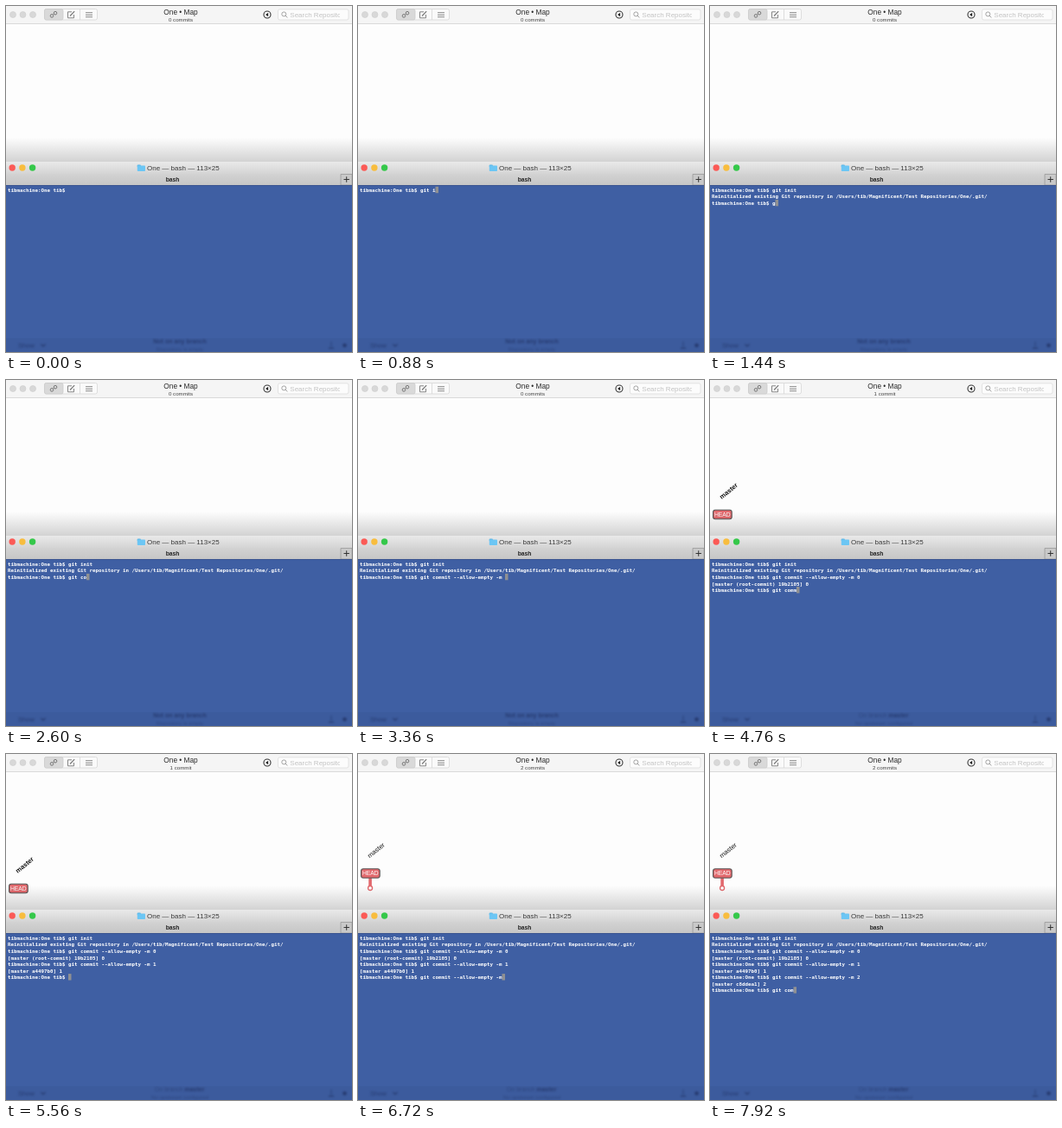
Write an HTML page with a canvas that moves like this. It is 400 px wide and 400 px high and loops after 8 s.

```html
<!DOCTYPE html>
<html lang="en">
<head>
<meta charset="utf-8">
<title>Terminal and map</title>
<style>
  html, body { margin: 0; width: 100%; height: 100%; overflow: hidden; background: #fdfdfd; }
  canvas { display: block; width: 100vw; height: 100vh; }
</style>
</head>
<body>
<canvas id="stage"></canvas>
<script>
const LOOP = 8000, SIZE = 400;
const SANS = '"Liberation Sans", Arial, sans-serif';
const MONO = '"DejaVu Sans Mono", monospace';
const CELL = 3.5, ROW = 7.55, LEFT = 2, TOP = 208.8;
const PROMPT = 'tibmachine:One tib$ ';
const FLAGS = '--allow-empty -m';
const FIRST_COMMIT = 4560, SECOND_COMMIT = 6080;

const canvas = document.getElementById('stage');
const ctx = canvas.getContext('2d');

// Terminal session: each event appends text at its time
const events = [];
const add = (time, text) => events.push({ time, text });
function type(from, to, text) {
  const step = (to - from) / (text.length - 1);
  [...text].forEach((char, i) => add(Math.round((from + i * step) / 40) * 40, char));
}

add(0, PROMPT);
add(240, 'g');
type(640, 1040, 'it init');
add(1200, '\n');
add(1240, 'Reinitialized existing Git repository in /Users/tib/Magnificent/Test Repositories/One/.git/\n');
add(1280, PROMPT);
add(1440, 'g');
type(2040, 2120, 'it');
type(2440, 2840, ' commi');
add(2920, 't ');
add(3080, FLAGS);
add(3360, ' ');
add(3640, '0');
add(3840, '\n');
add(4040, '[master (root-commit) 19b2105] 0\n');
add(4080, PROMPT);
type(4240, 4760, 'git comm');
type(4840, 4960, 'it ');
add(5080, FLAGS);
add(5320, ' ');
add(5400, '1');
add(5560, '\n[master a4497b0] 1\n' + PROMPT);
add(5720, 'g');
type(5920, 6560, 'it commit ');
add(6720, FLAGS);
add(7000, ' ');
add(7040, '2');
add(7240, '\n');
add(7320, '[master c8ddea1] 2\n');
add(7400, PROMPT);
type(7560, 7840, 'git c');
add(7920, 'om');

// Text is set large and scaled down so that glyph advances stay fractional
function label(text, x, y, size, color, { align = 'center', weight = '', family = SANS, angle = 0 } = {}) {
  ctx.save();
  ctx.translate(x, y);
  ctx.rotate(angle);
  ctx.scale(size / 100, size / 100);
  ctx.font = `${weight} 100px ${family}`;
  ctx.textAlign = align;
  ctx.fillStyle = color;
  ctx.fillText(text, 0, 0);
  ctx.restore();
}

function box(x, y, w, h, fill, stroke, radius = 0, width = 1) {
  ctx.beginPath();
  ctx.roundRect(x, y, w, h, radius);
  paint(fill, stroke, width);
}

function disc(x, y, r, fill, stroke, width = 1) {
  ctx.beginPath();
  ctx.arc(x, y, r, 0, Math.PI * 2);
  paint(fill, stroke, width);
}

function path(points, fill, stroke, width = 1) {
  ctx.beginPath();
  points.forEach(([x, y]) => ctx.lineTo(x, y));
  paint(fill, stroke, width);
}

function paint(fill, stroke, width) {
  if (fill) { ctx.fillStyle = fill; ctx.fill(); }
  if (stroke) { ctx.strokeStyle = stroke; ctx.lineWidth = width; ctx.stroke(); }
}

function shade(y0, y1, from, to) {
  const g = ctx.createLinearGradient(0, y0, 0, y1);
  g.addColorStop(0, from);
  g.addColorStop(1, to);
  return g;
}

function drawToolbar(commits) {
  box(0, 0, SIZE, 20.5, '#f5f5f5');
  box(0, 20, SIZE, 1, '#dadada');
  for (const x of [8, 19.5, 31]) disc(x, 10, 3.5, '#d8d8d8', '#cdcdcd', 0.6);

  box(44.5, 3.5, 61, 12.5, '#fafafa', '#d6d6d6', 2, 0.8);
  box(44.5, 3.5, 21.5, 12.5, '#d9d9d9', '#cccccc', 2, 0.8);
  box(85, 4, 0.8, 12, '#d6d6d6');
  disc(53, 11.4, 1.8, null, '#777', 1);
  disc(57, 8.2, 1.8, null, '#777', 1);
  path([[54.3, 10.4], [55.7, 9.2]], null, '#777');
  path([[76, 6.8], [71.5, 6.8], [71.5, 13.8], [78.5, 13.8], [78.5, 10]], null, '#777', 0.9);
  path([[74, 11.5], [79.2, 6.2]], null, '#777', 1.2);
  for (const y of [7.3, 9.8, 12.3]) box(92, y, 8, 0.9, '#777');

  label('One • Map', 202, 9.9, 8.3, '#2a2a2a');
  label(`${commits} commit${commits === 1 ? '' : 's'}`, 202, 17.8, 6.15, '#444');

  disc(302, 10, 4, '#fff', '#333', 1.1);
  path([[300, 10], [303.2, 7.8], [303.2, 12.2]], '#222');

  box(314.5, 3.8, 81.5, 12.2, '#fcfcfc', '#dcdcdc', 2, 0.8);
  disc(321.3, 9.4, 2.5, null, '#999', 0.9);
  path([[323.1, 11.2], [325.3, 13.4]], null, '#999', 1);
  ctx.save();
  ctx.beginPath();
  ctx.rect(326, 3, 60, 14);
  ctx.clip();
  label('Search Repository', 328.3, 12.8, 8, '#c2c2c2', { align: 'left' });
  ctx.restore();
}

function drawMap(commits) {
  if (!commits) return;
  const y = commits === 1 ? 155.5 : 138;
  if (commits === 2) {
    box(12.3, y + 5, 3.6, 12, '#e2686c');
    disc(14.1, 155, 2.5, '#fff', '#e2686c', 1.3);
  }
  box(3.6, y - 5.2, 21.6, 10.4, '#e2686c', '#555', 2.5, 1.1);
  label('HEAD', 14.3, y + 2.4, 6.7, '#fff');
  label('master', 13.5, y - 17.5, 7.5, '#111',
    { align: 'left', weight: commits === 1 ? 'bold' : '', angle: -0.68 });
}

function drawWindow() {
  box(0, 150, SIZE, 30, shade(152, 180, 'rgba(0,0,0,0)', 'rgba(0,0,0,0.17)'));
  box(0, 180, SIZE, 15, shade(180, 195, '#e9e9e9', '#d3d3d3'));
  box(0, 194.5, SIZE, 12.5, shade(194.5, 207, '#d2d2d2', '#c6c6c6'));
  ['#fb5a56', '#f8bd3e', '#35c84a'].forEach((c, i) => disc(7.2 + i * 11.7, 187, 3.7, c));

  box(151.8, 183.5, 4, 3, '#58b4e6', null, 0.8);
  box(151.8, 184.5, 9.2, 6.6, '#6cc6f4', null, 0.8);
  label('One — bash — 113×25', 163, 189.9, 8, '#3c3c3c', { align: 'left' });
  label('bash', 192.5, 202.8, 6.7, '#222', { weight: 'bold' });

  box(387, 194.5, 13, 12.5, '#c9c9c9', '#9a9a9a', 0, 0.8);
  box(390.5, 200, 6.4, 1, '#333');
  box(393.2, 197.3, 1, 6.4, '#333');
}

function drawBackdrop(commits) {
  const ink = 'rgba(28,42,88,0.62)', faint = 'rgba(28,42,88,0.4)';
  box(0, 207, SIZE, 193, '#3f5fa3');
  box(0, 207, SIZE, 0.8, '#38518a');
  box(0, 384, SIZE, 16, '#3c5b9d');
  ctx.save();
  ctx.filter = 'blur(0.8px)';
  label('Show', 23.5, 394.7, 7.5, ink);
  path([[40.5, 391], [43, 393.5], [45.5, 391]], null, ink, 1.2);
  if (commits) {
    label('On branch ', 206.5, 390.3, 7, faint, { align: 'right' });
    label('master', 206.5, 390.3, 7, ink, { align: 'left', weight: 'bold' });
    label('No upstream configured', 201, 399.4, 6.2, faint);
  } else {
    label('Not on any branch', 201, 390.3, 7, ink, { weight: 'bold' });
    label('Repository is empty', 201, 399.4, 6.2, faint);
  }
  path([[376, 388], [376, 394]], null, faint, 1.2);
  path([[373, 395.5], [379, 395.5]], null, ink, 1.2);
  disc(391.5, 392.3, 2.4, ink);
  ctx.restore();
}

function drawSession(time) {
  const text = events.filter(e => e.time <= time).map(e => e.text).join('');
  const lines = text.split('\n');
  const last = lines.length - 1;
  if (time >= 40) {
    box(LEFT + lines[last].length * CELL, TOP + last * ROW, CELL, 7.4, '#8f9092');
  }
  lines.forEach((line, i) => label(line, LEFT, TOP + 6.1 + i * ROW, CELL / 0.602, '#fff',
    { align: 'left', weight: 'bold', family: MONO }));
}

function resize() {
  const ratio = window.devicePixelRatio || 1;
  const w = Math.round(innerWidth * ratio), h = Math.round(innerHeight * ratio);
  if (canvas.width !== w || canvas.height !== h) {
    canvas.width = w;
    canvas.height = h;
  }
  ctx.setTransform(w / SIZE, 0, 0, h / SIZE, 0, 0);
}

const start = performance.now();
function frame() {
  const time = (performance.now() - start) % LOOP;
  const commits = (time >= FIRST_COMMIT) + (time >= SECOND_COMMIT);
  resize();
  box(0, 0, SIZE, SIZE, '#fdfdfd');
  drawToolbar(commits);
  drawMap(commits);
  drawWindow();
  drawBackdrop(commits);
  drawSession(time);
  requestAnimationFrame(frame);
}
frame();
</script>
</body>
</html>
```
